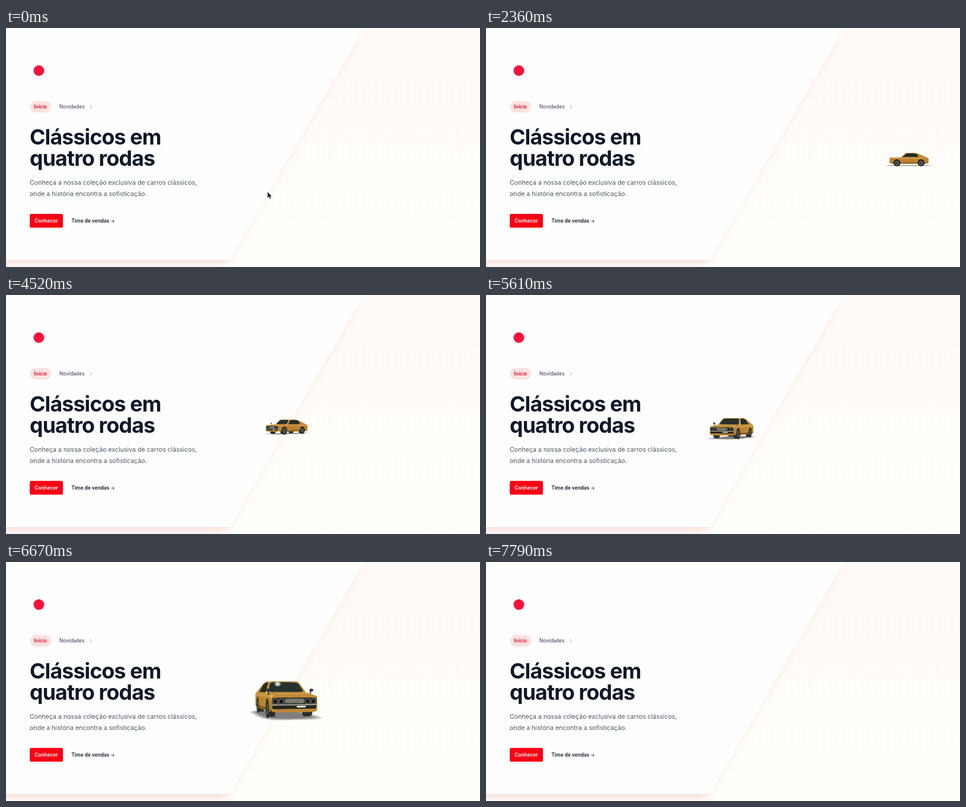
Recreate the animation shown at these times as an HTML page with a canvas. Size 800x404 px, loop 8.06 s.

```html
<!DOCTYPE html>
<html lang="pt-BR">
<head>
<meta charset="utf-8">
<title>Clássicos em quatro rodas</title>
<style>
  html, body { margin: 0; width: 100%; height: 100%; overflow: hidden; background: #fefefe; }
  .stage { position: absolute; left: 0; top: 0; width: 800px; height: 404px; overflow: hidden;
    background: linear-gradient(#fff9f7, #fffbf8 35%, #fefdf9 60%, #fefefb); }
  .panel { position: absolute; left: -800px; top: 0; width: 1404px; height: 392px;
    background: #fefefe; transform-origin: top right; transform: skewX(-30deg);
    box-shadow: 0 0 0 .6px #fef2f2, 0 12px 15px -3px rgba(220, 38, 38, .1), 0 5px 6px -4px rgba(220, 38, 38, .1); }
  svg, canvas { position: absolute; left: 0; top: 0; }
  text { font-family: Inter, "Open Sans", sans-serif; font-size: 8.4px; font-weight: 600; fill: #111827; }
  .title { font-size: 35.8px; font-weight: 700; letter-spacing: -.025em; }
  .lead { font-size: 10.63px; font-weight: 400; fill: #4b5563; }
</style>
</head>
<body>
<div class="stage">
  <div class="panel"></div>
  <svg width="800" height="404" viewBox="0 0 800 404">
    <circle cx="55.5" cy="72" r="9" fill="#f8133f"/>
    <rect x="40" y="123.3" width="36.3" height="19.6" rx="9.8" fill="#fde2e2"/>
    <text x="47.2" y="136" style="fill:#e0142f">Início</text>
    <text x="90" y="136" style="fill:#4b5563;font-weight:500">Novidades</text>
    <path d="M141.7 130.2l3 2.9-3 2.9" fill="none" stroke="#9ca3af" stroke-width=".95"/>
    <text class="title" x="40" y="197">Clássicos em</text>
    <text class="title" x="40" y="233">quatro rodas</text>
    <text class="lead" x="40" y="265">Conheça a nossa coleção exclusiva de carros clássicos,</text>
    <text class="lead" x="40" y="284.2">onde a história encontra a sofisticação.</text>
    <rect x="40.1" y="314.2" width="56" height="23.4" rx="2.6" fill="#f70014"/>
    <text x="48.2" y="328.6" style="fill:#fff">Conhecer</text>
    <text x="110.4" y="328.6">Time de vendas <tspan font-weight="500" style="font-size:7.4px">→</tspan></text>
  </svg>
  <canvas id="road" width="800" height="404"></canvas>
  <svg width="800" height="404" viewBox="0 0 800 404">
    <path id="cursor" d="M0 0V9.7L2.3 7.7 3.9 11.2 5.5 10.5 3.9 7.1H7.1Z" fill="#222" stroke="#fff" stroke-width=".8" paint-order="stroke"/>
  </svg>
</div>
<script>
const LOOP = 8060, START = 1520, END = 7790;
const FOCAL = 488, CENTRE = 398, HORIZON = 217, EYE = 1.02;
const ctx = document.getElementById('road').getContext('2d');
const cursor = document.getElementById('cursor');
const clamp = (x, lo = 0, hi = 1) => Math.min(hi, Math.max(lo, x));
const mix = (a, b, p) => a + (b - a) * p;

// A hyperbolic sweep across the road while the distance eases towards the viewer
function drive(t) {
  const u = (t - 5930) / 1000;
  const dist = 20 + 12 * Math.cos(Math.PI * clamp((t - 3500) / 4400));
  const across = .6 + 28.8 * (Math.hypot(1, u / 2.6) - 1) + .14 * Math.max(0, u) ** 4;
  const turn = Math.max(0, (t - 2950) / 3720);
  const deg = 103.5 * turn + 5 * Math.sin(2 * Math.PI * turn);
  return { x: CENTRE + across * FOCAL / dist, dist, angle: deg * Math.PI / 180 };
}

let car, cos, sin;

// u: towards the nose, y: up, v: sideways, all in metres
function project(u, y, v) {
  const k = FOCAL / (car.dist - (u * sin + v * cos));
  return [car.x + (v * sin - u * cos) * k, HORIZON + (EYE - y) * k];
}

function poly(points, fill) {
  ctx.beginPath();
  points.forEach(p => ctx.lineTo(...project(...p)));
  ctx.closePath();
  ctx.fillStyle = fill;
  ctx.fill();
}

// Superellipse on a plane: power 1 is round, near 0 is square
const bend = (x, power) => Math.sign(x) * Math.abs(x) ** power;
function blob(plane, x, y, rx, ry, power, fill) {
  const points = Array.from({ length: 48 }, (_, i) => {
    const a = i / 24 * Math.PI;
    return plane(x + rx * bend(Math.cos(a), power), y + ry * bend(Math.sin(a), power));
  });
  poly(points, fill);
}

const ground = (u, v) => [u, 0, v];
const nose = (v, y) => [2.1, y, v];
const flank = v => (u, y) => [u, y, v];
const glass = (a, b) => [.88 - .5 * b, .92 + .47 * b, a * (.83 - .2 * b)];
const cabin = sg => ([u, y]) => [u, y, sg * (.84 - (y - .92) * .48)];

const PROFILE = [[.9, .9], [.35, 1.39], [-.5, 1.41], [-1, 1.32], [-1.95, .9]];
const WINDOW = PROFILE.slice(0, 4).concat([[-1.2, .9]]).map(([u, y]) => [mix(-.15, u, .82), mix(1.15, y, .8)]);

function shadow() {
  for (let r = 1; r > .7; r -= .04)
    blob(ground, 0, 0, 2.65 * r, 1.24 * r, .55, 'rgba(45,45,45,.11)');
}

function tyres() {
  for (const u of [-1.3, 1.3]) for (const sg of [-1, 1])
    for (let v = .6; v < .86; v += .05) blob(flank(sg * v), u, .31, .31, .31, 1, '#2c2d2b');
}

function bonnet() {
  poly([[2.05, .83, -.82], [.85, .93, -.84], [.85, .93, .84], [2.05, .83, .82]], '#c9933e');
}

function side(sg) {
  const plane = flank(sg * .86);
  blob(plane, 0, .57, 2.1, .34, .22, '#b9842f');
  blob(plane, 0, .82, 1.95, .06, .3, '#d0994a');
  blob(plane, 0, .3, 1.9, .06, .3, '#85601f');
  for (const u of [-1.3, 1.3]) {
    blob(plane, u, .33, .38, .38, 1, '#30271a');
    blob(plane, u, .31, .31, .31, 1, '#30312f');
    blob(plane, u, .31, .2, .2, 1, '#70726c');
    blob(plane, u, .31, .13, .13, 1, '#3c3e3c');
  }
}

function front() {
  blob(nose, 0, .54, .86, .31, .22, '#bd8935');
  blob(nose, 0, .63, .83, .13, .25, '#2e302d');
  blob(nose, 0, .64, .36, .08, .2, '#7a7b70');
  blob(nose, 0, .43, .82, .08, .2, '#252622');
  blob(nose, 0, .5, .85, .025, .2, '#98978a');
  blob(nose, .25, .43, .17, .03, .2, '#e8e6dc');
  for (const v of [-.71, -.49, .49, .71]) {
    blob(nose, v, .62, .1, .1, 1, '#85867d');
    blob(nose, v, .62, .08, .08, 1, '#171918');
  }
}

function windscreen() {
  blob(glass, 0, .5, 1, .52, .2, '#c58f3b');
  blob(glass, 0, .5, .91, .43, .25, '#26312d');
  const glint = clamp((car.angle - 1.36) * 3);
  for (let r = .2; r > .05; r -= .05)
    blob(glass, -.42, .78, r, r * 1.1, 1, `rgba(255,255,245,${glint * .4})`);
}

function mirror(sg) {
  blob((v, y) => [1.4, y, v], sg * .83, .94, .025, .09, .5, '#3a3a36');
  blob((v, y) => [1.4, y, v], sg * .87, 1.03, .08, .055, 1, '#343633');
}

function drawCar(t) {
  ctx.clearRect(0, 0, 800, 404);
  if (t < START) return;
  const step = END - Math.ceil((END - Math.min(t, END)) / 30) * 30;
  car = drive(step);
  cos = Math.cos(car.angle);
  sin = Math.sin(car.angle);
  const near = cos < 0 ? -1 : 1;
  const facing = near * cos * car.dist;

  shadow();
  tyres();
  mirror(-near);
  bonnet();
  if (facing > .86) side(near);
  if (sin * car.dist > 2.1) front();
  if (facing > .65) {
    poly(PROFILE.map(cabin(near)), '#c28d38');
    poly(WINDOW.map(cabin(near)), '#242d28');
  }
  if (sin * car.dist > .9) windscreen();
  mirror(near);
}

function ease(t, from, to) {
  const p = clamp((t - from) / (to - from));
  return p * p * (3 - 2 * p);
}

function drawCursor(t) {
  const go = ease(t, 560, 940), leave = ease(t, 1520, 2200);
  const x = mix(mix(441.5, 646, go), 606, leave);
  const y = mix(mix(277.3, 329.8, go), 408, leave);
  cursor.setAttribute('transform', `translate(${x} ${y})`);
}

function frame() {
  const t = performance.now() % LOOP;
  drawCar(t);
  drawCursor(t);
  requestAnimationFrame(frame);
}
frame();
</script>
</body>
</html>
```
